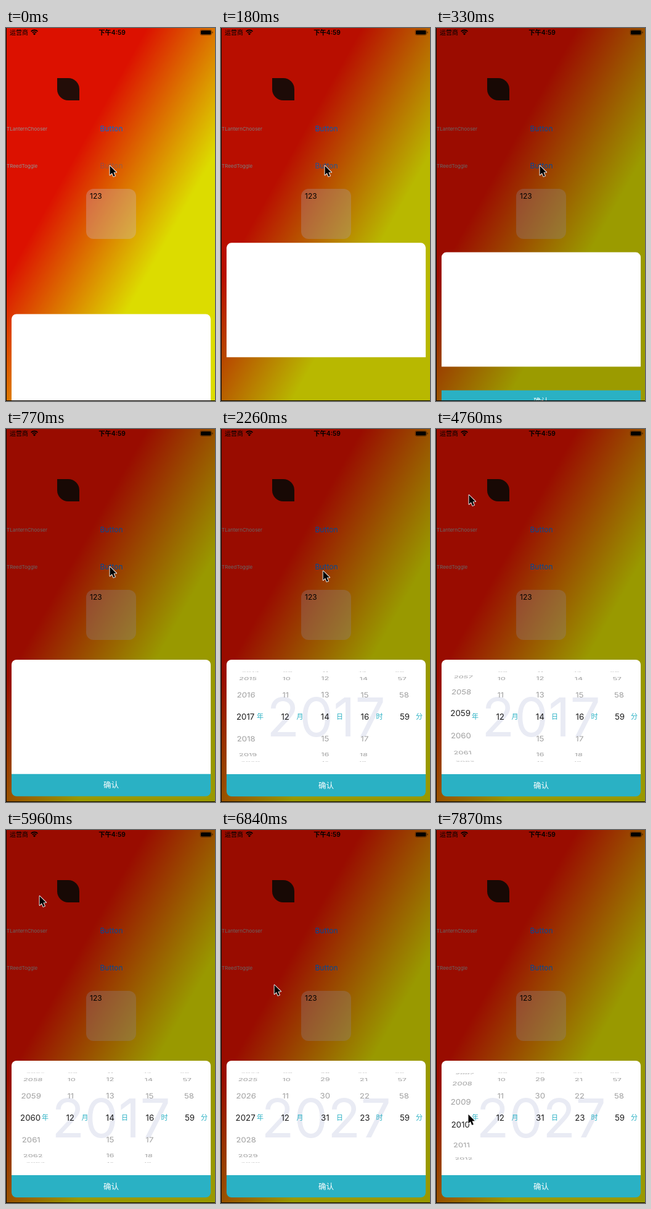
Write an HTML page with a canvas that moves like this. It is 339 px wide and 603 px high and loops after 8 s.

```html
<!DOCTYPE html>
<html lang="zh">
<head>
<meta charset="utf-8">
<title>Date picker sheet</title>
<style>
html, body { margin: 0; width: 100%; height: 100%; overflow: hidden; background: #000; }
canvas { display: block; width: 339px; height: 603px; }
</style>
</head>
<body>
<canvas id="stage"></canvas>
<script>
const W = 339, H = 603, LOOP = 8000;
const STEP = 147.9, FIRST_STEP = 180;
const FONT = 'Inter, "Noto Sans CJK SC", "Noto Sans CJK", sans-serif';
const TEAL = '#2ab1c4';
const SHEET = { x: 9, w: 323, top: 373, split: 558, bottom: 594 };
const WHEEL = { x: 168.6, y: 465, radius: 78.5, angle: Math.PI * 0.15, depth: 980 };

const canvas = document.getElementById('stage');
const dpr = window.devicePixelRatio || 1;
canvas.width = W * dpr;
canvas.height = H * dpr;
const ctx = canvas.getContext('2d');
ctx.scale(dpr, dpr);

const clamp = v => Math.min(1, Math.max(0, v));
const mix = (a, b, p) => a + (b - a) * p;
const easeOut = p => 1 - (1 - p) ** 3;
const smooth = p => p * p * (3 - 2 * p);
const span = (t, a, b) => clamp((t - a) / (b - a));

function text(str, x, y, size, color, align = 'center', weight = 400) {
  ctx.font = `${weight} ${size}px ${FONT}`;
  ctx.textAlign = align;
  ctx.fillStyle = color;
  ctx.fillText(str, x, y + size * 0.364);
}

function box(x, y, w, h, radii, color) {
  ctx.beginPath();
  ctx.roundRect(x, y, w, h, radii);
  ctx.fillStyle = color;
  ctx.fill();
}

// Remaining distance (1 to 0) of an underdamped spring.
function spring(time) {
  if (time <= 0) return 1;
  const w = Math.PI / 330;
  return Math.exp(-0.0066 * time) * (Math.cos(w * time) + 0.694 * Math.sin(w * time));
}

// Diagonal red-to-yellow ramp, perpendicular to x/W + y/H = const.
function makeBackdrop() {
  const nx = 1 / W, ny = 1 / H, len2 = nx * nx + ny * ny;
  const at = u => [u * nx / len2, u * ny / len2];
  const g = ctx.createLinearGradient(...at(0.675), ...at(1.34));
  g.addColorStop(0, 'rgb(255,20,0)');
  g.addColorStop(1, 'rgb(257,255,0)'.replace('257', '255'));
  return g;
}
const backdrop = makeBackdrop();

function drawStatusBar() {
  text('运营商', 6, 7.5, 10, '#000', 'left');
  text('下午4:59', 172, 7.5, 10.3, '#000', 'center', 600);
  ctx.strokeStyle = '#000';
  ctx.lineWidth = 1.7;
  for (const r of [4.6, 7.6]) {
    ctx.beginPath();
    ctx.arc(46, 11, r, -Math.PI * 0.75, -Math.PI * 0.25);
    ctx.stroke();
  }
  ctx.beginPath();
  ctx.moveTo(46, 11.5);
  ctx.arc(46, 11.5, 3, -Math.PI * 0.75, -Math.PI * 0.25);
  ctx.fill();
  ctx.lineWidth = 0.8;
  ctx.strokeStyle = 'rgba(0,0,0,0.45)';
  ctx.beginPath();
  ctx.roundRect(315, 3, 18.5, 8.5, 2.4);
  ctx.stroke();
  box(316, 4, 16.5, 6.5, 1.5, '#000');
  box(334.4, 5.7, 1.2, 3, 0.6, 'rgba(0,0,0,0.5)');
}

function drawPage(t) {
  ctx.fillStyle = backdrop;
  ctx.fillRect(0, 0, W, H);
  box(83, 81, 36, 36, [0, 18, 0, 18], 'rgb(40,15,9)');
  text('TLanternChooser', 1, 163, 8, '#aaa', 'left');
  text('TReedToggle', 1, 223, 8, '#aaa', 'left');
  text('Button', 171, 163, 12, '#007aff');
  ctx.globalAlpha = Math.min(1, 0.3 + t / 360);
  text('Button', 171, 223, 12, '#007aff');
  ctx.globalAlpha = 1;
  box(130, 260, 81, 81, 12, 'rgba(235,215,235,0.32)');
  text('123', 136, 272, 12, '#000', 'left');
  drawStatusBar();
  ctx.fillStyle = `rgba(0,0,0,${0.4 * clamp((t + 180) / 520)})`;
  ctx.fillRect(0, 0, W, H);
}

function yearAt(t) {
  if (t < 3050) return 2017 + 11 * span(t, 2800, 3050) ** 1.5;
  if (t < 5600) return 2060 - 32 * Math.exp((3050 - t) / 472);
  if (t < 7250) return mix(2060, 2027, easeOut(span(t, 6020, 6600)));
  if (t < 7350) return 2027 - 3.6 * span(t, 7250, 7350) ** 1.3;
  return 2023.4 - 20.5 * (1 - Math.exp((7350 - t) / 472));
}

// One column of labels rolled around a cylinder seen in perspective.
function drawWheel(cx, pos, min, max) {
  const { radius, angle, depth } = WHEEL;
  const x = cx - WHEEL.x;
  for (let n = Math.floor(pos) - 3; n <= Math.ceil(pos) + 3; n++) {
    const turn = (n - pos) * angle;
    if (n < min || n > max || Math.abs(turn) > 1.5) continue;
    const sin = Math.sin(turn), cos = Math.cos(turn);
    const k = depth / (depth + radius * (1 - cos));
    const lean = k * k * sin / depth;
    const y = radius * sin;
    ctx.save();
    ctx.transform(k, 0, -x * lean, k * cos - y * lean, WHEEL.x + x * k, WHEEL.y + y * k);
    const selected = Math.abs(n - pos) < 0.5;
    text(String(n).padStart(2, '0'), 0, 0, 13.3, selected ? '#1c1c1c' : 'rgba(0,0,0,0.38)');
    ctx.restore();
  }
}

function drawPicker(t) {
  const snap = easeOut(span(t, 6020, 6600));
  text(t < 6020 ? '2017' : '2027', 170.5, 465.5, 87, '#e9ebf4');
  const columns = [
    ['年', yearAt(t), 1900, 2200],
    ['月', 12, 1, 12],
    ['日', mix(14, 31, snap), 1, 31],
    ['时', mix(16, 23, snap), 0, 23],
    ['分', 59, 0, 59]
  ];
  ctx.save();
  ctx.beginPath();
  ctx.rect(SHEET.x, 390, SHEET.w, 150);
  ctx.clip();
  columns.forEach(([unit, pos, min, max], i) => {
    drawWheel(39.6 + 64.6 * i, pos, min, max);
    text(unit, 63.6 + 64.5 * i, 465, 11, TEAL);
  });
  ctx.restore();
}

function drawSheet(t) {
  const { x, w, top, split, bottom } = SHEET;
  const y = top + 230 * spring(t + 135);
  box(x, y, w, split - top, [8, 8, 0, 0], '#fff');
  if (t > 1340) drawPicker(t);
  const by = split + 46 * spring(t - 230);
  box(x, by, w, bottom - split, [0, 0, 8, 8], TEAL);
  text('确认', 170.5, by + 18, 12.5, '#fff');
}

// time, x, y of the pointer tip
const POINTER = [
  [0, 168, 222], [2200, 168, 222], [2750, 48, 505], [2800, 48, 500],
  [3050, 52, 103], [3250, 53, 106], [4900, 53, 106], [5000, 54, 106],
  [6150, 54, 106], [6690, 96, 200], [7150, 54, 410], [7250, 52, 412],
  [7350, 51, 529], [7500, 51, 529], [7800, 52, 459], [LOOP, 52, 459]
];

function drawPointer(t) {
  const i = POINTER.findIndex(key => key[0] > t);
  const [t0, x0, y0] = POINTER[i - 1], [t1, x1, y1] = POINTER[i];
  const p = smooth(span(t, t0, t1));
  ctx.save();
  ctx.translate(mix(x0, x1, p), mix(y0, y1, p));
  ctx.beginPath();
  [[0.5, 0.8], [0.5, 15.5], [3.9, 12.3], [6.3, 18], [8.9, 16.9], [6.5, 11.4], [11, 11.2]]
    .forEach(([x, y]) => ctx.lineTo(x, y));
  ctx.closePath();
  ctx.lineJoin = 'round';
  ctx.lineWidth = 1.8;
  ctx.strokeStyle = '#fff';
  ctx.stroke();
  ctx.fillStyle = '#000';
  ctx.fill();
  ctx.restore();
}

function render(t) {
  drawPage(t);
  drawSheet(t);
  drawPointer(t);
  ctx.fillStyle = '#0a0500';
  ctx.fillRect(0, 0, 1, H);
  ctx.fillRect(0, H - 1, W, 1);
}

// Motion is held on a steady low frame rate.
function heldTime(t) {
  const step = Math.floor((t - FIRST_STEP + 10) / STEP);
  return step < 0 ? 0 : Math.min(LOOP - 1, FIRST_STEP + step * STEP);
}

function tick() {
  render(heldTime(performance.now() % LOOP));
  requestAnimationFrame(tick);
}
tick();
</script>
</body>
</html>
```
